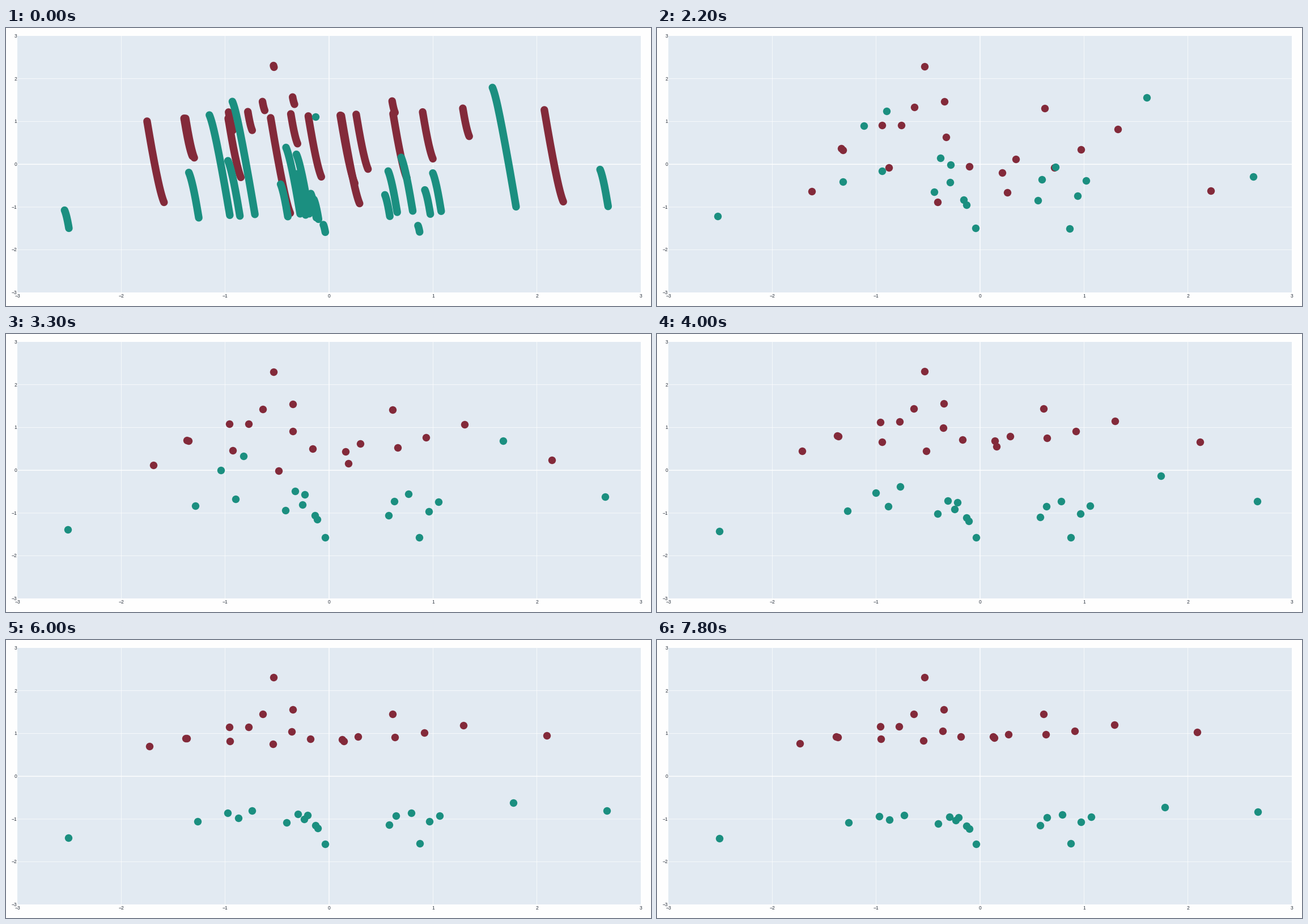
A matplotlib script that plays this animation: 1138x492 px, repeating every 8000 ms.

```python
import numpy as np
import matplotlib.pyplot as plt
from matplotlib.animation import FuncAnimation
from matplotlib.patches import Rectangle

W, H, DPI = 1138, 492, 64
PT = 72 / DPI                      # points per pixel
LEFT, TOP, RIGHT, BOTTOM = 20, 14, 1120, 468.4
SX, SY = (RIGHT - LEFT) / 6, (BOTTOM - TOP) / 6
ORIGIN = np.array([LEFT + 3 * SX, TOP + 3 * SY])
SCALE = np.array([SX, -SY])

RED, TEAL = "#832a3a", "#1b8f80"
DOT = 13.4 * PT
STEPS, ANCHOR, TRAIL_STEPS = 64, 19, 220
HOLD, FRAMES, INTERVAL = 14, 80, 100

# One key point per dot, in pixels; the whole path follows from it
RED_DOTS = [
    (472, 66.5), (506, 124), (453, 133), (394.5, 159), (428.5, 158.5),
    (319, 187.5), (322, 189), (400, 205.5), (506, 172), (541.5, 202.5),
    (481.5, 242), (260.5, 231.5), (599, 207.5), (604.5, 228.5), (625, 194),
    (682, 133.5), (691.5, 201), (741, 182.5), (809, 159.5), (963.5, 223),
]
TEAL_DOTS = [
    (109.5, 346), (334.5, 303.5), (379, 241), (419, 215.5), (405.5, 291.5),
    (493.5, 312), (510, 277.5), (527, 283.5), (523.5, 301.5), (545, 321),
    (549.5, 327.5), (563, 359.5), (675, 320.5), (685, 296), (710.5, 283),
    (746, 314), (763, 296.5), (729.5, 359.5), (877.5, 189), (1057.5, 288),
]
LONE_DOT = (546, 157)


def velocity(p, label, t):
    """Gradient of a logistic loss that pushes dots off a tilted line."""
    speed = min(0.028 + 0.0081 * t, 0.40)
    steep = 0.4 + 4.7 / (1 + np.exp((22.5 - t) / 7.5))
    sat = 0.6 - 0.25 * np.exp(-t / 8)
    tilt = 0.07 + 0.105 * np.exp(-t / 7)
    margin = label * (p[:, 1] - tilt * p[:, 0])
    v = label * speed / (1 + np.exp(steep * margin)) / np.cosh(sat * margin) ** 2
    return np.column_stack([-tilt * v, v])


def simulate(dots, label):
    """Pixel paths of all dots, shape (steps, dots, 2)."""
    path = np.zeros((TRAIL_STEPS + 1, len(dots), 2))
    path[ANCHOR] = (np.array(dots) - ORIGIN) / SCALE
    for t in range(ANCHOR, TRAIL_STEPS):
        path[t + 1] = path[t] + velocity(path[t], label, t)
    for t in range(ANCHOR - 1, -1, -1):
        p = path[t + 1]
        for _ in range(5):         # solve the step backwards
            p = path[t + 1] - velocity(p, label, t)
        path[t] = p
    return path * SCALE + ORIGIN


fig = plt.figure(figsize=(W / DPI, H / DPI), dpi=DPI, facecolor="#fefefe")
ax = fig.add_axes([0, 0, 1, 1])
ax.set_xlim(0, W)
ax.set_ylim(H, 0)
ax.axis("off")

ax.add_patch(Rectangle((LEFT, TOP), RIGHT - LEFT, BOTTOM - TOP,
                       facecolor="#e2eaf2", edgecolor="none", zorder=0))
label_style = dict(family="Liberation Sans", size=8.5 * PT, color="#2c3440")
for i in range(-3, 4):
    x, y = ORIGIN + i * SCALE
    grid = dict(color="white", lw=(1.42 if i == 0 else 0.71) * PT,
                solid_capstyle="butt", snap=False, zorder=1)
    if abs(i) < 3:
        ax.plot([x, x], [TOP, BOTTOM], **grid)
        ax.plot([LEFT, RIGHT], [y, y], **grid)
    text = str(i).replace("-", "\u2212")
    ax.text(x, 474.8, text, ha="center", va="center", **label_style)
    ax.text(19.3, y + 0.3, text, ha="right", va="center", **label_style)


class Group:
    """The dots of one class with their trails."""

    def __init__(self, dots, label, color, z):
        self.path = simulate(dots, label)
        self.trails = [
            ax.plot(*self.path[:, k].T, color=color, lw=DOT, zorder=z,
                    solid_capstyle="round", solid_joinstyle="round")[0]
            for k in range(len(dots))]
        self.dots, = ax.plot([], [], "o", ms=DOT, mfc=color, mec="none", zorder=z)

    def show(self, i):
        for trail in self.trails:
            trail.set_visible(i < HOLD)
        self.dots.set_visible(i >= HOLD)
        self.dots.set_data(*self.path[np.clip(i - HOLD, 0, STEPS)].T)


groups = [Group(RED_DOTS, 1, RED, 3), Group(TEAL_DOTS, -1, TEAL, 4)]
lone, = ax.plot(*LONE_DOT, "o", ms=DOT, mfc=TEAL, mec="none", zorder=4)


def update(i):
    for group in groups:
        group.show(i)
    lone.set_visible(i < HOLD)


anim = FuncAnimation(fig, update, frames=FRAMES, interval=INTERVAL,
                     repeat=True, repeat_delay=0, blit=False)
plt.show()
```
